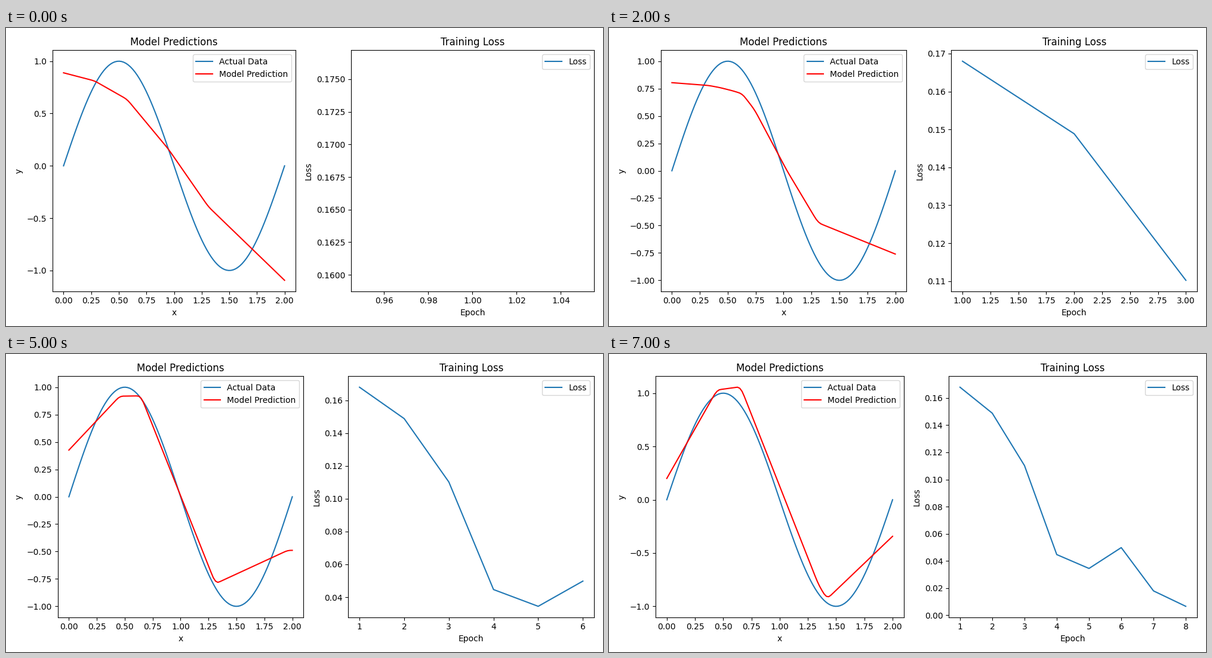
Recreate the animation shown at these times as a matplotlib script. Size 1000 by 500 pixels, loop 8000 ms.

```python
import numpy as np
import matplotlib.pyplot as plt
from matplotlib.animation import FuncAnimation

plt.rcParams["font.family"] = "DejaVu Sans"

EPOCHS = 8
LOSSES = [0.16798, 0.14885, 0.11022, 0.04466, 0.03444, 0.0498, 0.0179, 0.00654]

# Key points of the fitted curve by epoch; epochs in between are blended.
FITS = {
    1: [(0, .889), (.28, .812), (.575, .635), (.95, .158), (1.31, -.39), (2, -1.094)],
    2: [(0, .866), (.33, .775), (.55, .665), (.74, .545), (1.03, .018),
        (1.295, -.352), (2, -.8015)],
    4: [(0, .742), (.43, .793), (.63, .79), (1.315, -.59), (2, -.719)],
    6: [(0, .426), (.455, .918), (.644, .921), (1.313, -.793), (1.96, -.489), (2, -.489)],
    7: [(0, .311), (.46, 1.013), (.658, 1.027), (1.352, -.785), (1.925, -.303), (2, -.287)],
    8: [(0, .2), (.445, 1.03), (.653, 1.06), (1.345, -.8), (1.42, -.93), (2, -.343)],
}

x = np.linspace(0, 2, 100)
actual = np.sin(np.pi * x)


def soft_hinge(d, radius=0.03):
    """max(d, 0) with its corner rounded over the given radius."""
    rounded = (np.clip(d, -radius, radius) + radius) ** 2 / (4 * radius)
    return rounded + np.maximum(d - radius, 0)


def soft_polyline(points):
    px, py = np.transpose(points)
    slopes = np.diff(py) / np.diff(px)
    line = py[0] + slopes[0] * (x - px[0])
    return line + sum(bend * soft_hinge(x - corner)
                      for corner, bend in zip(px[1:], np.diff(slopes)))


def prediction(epoch):
    if epoch in FITS:
        return soft_polyline(FITS[epoch])
    return (prediction(epoch - 1) + prediction(epoch + 1)) / 2


def decorate(ax, title, xlabel, ylabel):
    ax.set_title(title)
    ax.set_xlabel(xlabel)
    ax.set_ylabel(ylabel)
    ax.legend(loc="upper right")


fig, (fit_ax, loss_ax) = plt.subplots(1, 2, figsize=(10, 5), dpi=100)


def update(frame):
    epoch = frame + 1
    fit_ax.clear()
    fit_ax.plot(x, actual, label="Actual Data")
    fit_ax.plot(x, prediction(epoch), color="red", label="Model Prediction")
    decorate(fit_ax, "Model Predictions", "x", "y")

    loss_ax.clear()
    loss_ax.plot(range(1, epoch + 1), LOSSES[:epoch], label="Loss")
    decorate(loss_ax, "Training Loss", "Epoch", "Loss")

    # The second pass settles the layout whatever frame came before.
    for _ in range(2):
        fig.tight_layout()
    return []


animation = FuncAnimation(fig, update, frames=EPOCHS, interval=1000,
                          repeat=True, repeat_delay=0)
plt.show()
```
